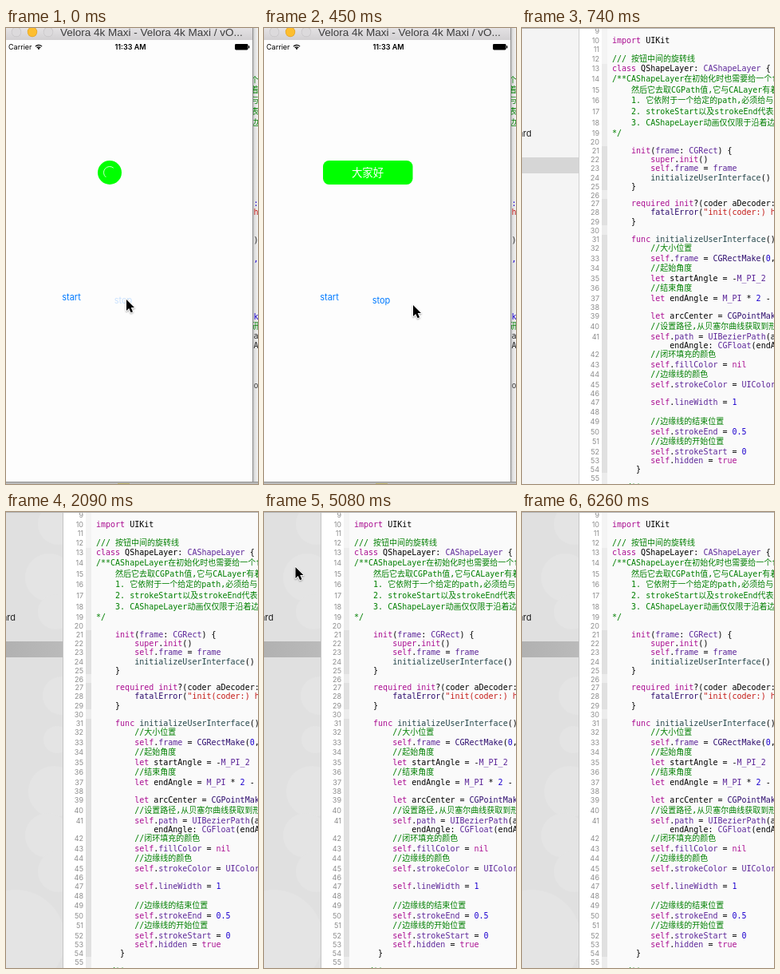
An HTML page with a canvas for the animation above (8000 ms loop, 316x571 px).

```html
<!DOCTYPE html>
<html lang="zh">
<head>
<meta charset="utf-8">
<style>
html, body { margin: 0; width: 100%; height: 100%; overflow: hidden; background: #fff; }
canvas { display: block; width: 316px; height: 571px; }
</style>
</head>
<body>
<canvas id="stage"></canvas>
<script>
const W = 316, H = 571, LOOP = 8000;
const canvas = document.getElementById('stage');
const ctx = canvas.getContext('2d');
const dpr = window.devicePixelRatio || 1;
canvas.width = W * dpr;
canvas.height = H * dpr;

const MONO = '10px "DejaVu Sans Mono", "Noto Sans CJK SC", "Noto Sans CJK", monospace';
const UI = 'Inter, "Open Sans", sans-serif';
const HAN = '"Noto Sans CJK SC", "Noto Sans CJK", sans-serif';

const GREEN = '#007f00', PINK = '#aa0d91', PURPLE = '#5c2699', NAVY = '#2e0d6e';
const BLUE = '#1c00cf', RED = '#c41a16', TEAL = '#26474b';

const words = (list, color) => list.split(' ').map(w => [w, color]);
const COLORS = new Map([
  ...words('import class init super self required func let nil true', PINK),
  ...words('CAShapeLayer CGRect M_PI M_PI_2 UIBezierPath CGFloat UIColor', PURPLE),
  ...words('frame path fillColor strokeColor lineWidth strokeEnd strokeStart hidden', PURPLE),
  ...words('CGRectMake CGPointMake fatalError', NAVY),
  ['initializeUserInterface', TEAL]
]);

// [vertical centre, code]; a leading ">" marks a wrapped line
const CODE = [
  [3, ''],
  [15, 'import UIKit'],
  [26, ''],
  [38, '/// 按钮中间的旋转线'],
  [50.5, 'class QShapeLayer: CAShapeLayer {'],
  [63, '/**CAShapeLayer在初始化时也需要给一个frame'],
  [77, '    然后它去取CGPath值,它与CALayer有着'],
  [90, '    1. 它依附于一个给定的path,必须给与'],
  [104, '    2. strokeStart以及strokeEnd代表着'],
  [118, '    3. CAShapeLayer动画仅仅限于沿着边'],
  [131, '*/'],
  [142, ''],
  [153, '    init(frame: CGRect) {'],
  [164, '        super.init()'],
  [175.5, '        self.frame = frame'],
  [187, '        initializeUserInterface()'],
  [198, '    }'],
  [209, ''],
  [219.5, '    required init?(coder aDecoder: NSCoder'],
  [230.5, '        fatalError("init(coder:) has'],
  [242, '    }'],
  [253, ''],
  [264, '    func initializeUserInterface() {'],
  [275.5, '        //大小位置'],
  [288.5, '        self.frame = CGRectMake(0, 0'],
  [300.5, '        //起始角度'],
  [313.5, '        let startAngle = -M_PI_2'],
  [325.5, '        //结束角度'],
  [338, '        let endAngle = M_PI * 2 - M_PI'],
  [349, ''],
  [360.5, '        let arcCenter = CGPointMake('],
  [373, '        //设置路径,从贝塞尔曲线获取到形状'],
  [386, '        self.path = UIBezierPath(arc'],
  [397, '>            endAngle: CGFloat(endAngle'],
  [408.5, '        //闭环填充的颜色'],
  [421.5, '        self.fillColor = nil'],
  [433.5, '        //边缘线的颜色'],
  [446.5, '        self.strokeColor = UIColor.'],
  [457, ''],
  [468.5, '        self.lineWidth = 1'],
  [480, ''],
  [492, '        //边缘线的结束位置'],
  [505, '        self.strokeEnd = 0.5'],
  [517, '        //边缘线的开始位置'],
  [530, '        self.strokeStart = 0'],
  [541, '        self.hidden = true'],
  [552, '     }'],
  [563, ''],
  [574, '   /**']
];

// Code peeking out beside the phone window
const PEEK = [
  [65, '个', GREEN], [77, '着', GREEN], [90, '与', GREEN], [104, '表', GREEN], [118, '边', GREEN],
  [219, ':', BLUE], [230, 'h', RED], [265, ')', '#222'], [289, ',', BLUE],
  [361, 'k', BLUE], [373, '研', GREEN], [385, 'a', '#222'], [397, 'A', '#222'], [447, 'or', '#444']
];

// [start, kind, x, y]
const POINTER = [
  [0, 'arrow', 150, 339], [450, 'arrow', 186, 346], [590, 'none', 0, 0],
  [2240, 'arrow', 33, 62], [2390, 'arrow', 35, 65], [5080, 'arrow', 38.5, 68],
  [5230, 'beam', 113, 118], [5380, 'beam', 155, 150], [5670, 'beam', 159, 195],
  [5820, 'beam', 162, 237], [6120, 'arrow', 92, 419], [6260, 'none', 0, 0]
];

function rect(x, y, w, h, fill) {
  ctx.fillStyle = fill;
  ctx.fillRect(x, y, w, h);
}

function disc(x, y, r, fill) {
  ctx.beginPath();
  ctx.arc(x, y, r, 0, Math.PI * 2);
  ctx.fillStyle = fill;
  ctx.fill();
}

function text(s, x, y, font, fill, align = 'left') {
  ctx.font = font;
  ctx.fillStyle = fill;
  ctx.textAlign = align;
  ctx.fillText(s, x, y);
}

function fade(x0, y0, x1, y1, ...stops) {
  const g = ctx.createLinearGradient(x0, y0, x1, y1);
  stops.forEach((c, i) => g.addColorStop(i / (stops.length - 1), c));
  return g;
}

function pill(x, y, w, h, r, fill) {
  ctx.beginPath();
  ctx.roundRect(x, y, w, h, r);
  ctx.fillStyle = fill;
  ctx.fill();
}

function arrow(x, y) {
  ctx.save();
  ctx.translate(x, y);
  ctx.beginPath();
  [[1, 1], [1, 15], [4.2, 12], [6.6, 17.3], [9, 16.2], [6.7, 11.1], [11, 11.1]]
    .forEach(p => ctx.lineTo(...p));
  ctx.closePath();
  ctx.lineJoin = 'round';
  ctx.lineWidth = 1.8;
  ctx.strokeStyle = '#fff';
  ctx.shadowColor = 'rgba(0,0,0,.35)';
  ctx.shadowBlur = 2;
  ctx.shadowOffsetY = 1;
  ctx.stroke();
  ctx.shadowColor = 'transparent';
  ctx.fillStyle = '#000';
  ctx.fill();
  ctx.restore();
}

function beam(x, y) {
  rect(x + 3, y + 1, 1, 14, '#222');
  rect(x + 2.5, y + 10, 2, 1, '#222');
  for (const edge of [0, 15]) {
    rect(x, y + edge, 3, 1, '#222');
    rect(x + 4, y + edge, 3, 1, '#222');
  }
}

function pointer(t) {
  const [, kind, x, y] = POINTER.filter(p => p[0] <= t).pop();
  if (kind === 'arrow') arrow(x, y);
  if (kind === 'beam') beam(x, y);
}

function wifi() {
  ctx.strokeStyle = '#000';
  ctx.lineWidth = 1.2;
  for (const r of [3.2, 5.6]) {
    ctx.beginPath();
    ctx.arc(41, 27, r, -Math.PI * 0.76, -Math.PI * 0.24);
    ctx.stroke();
  }
  disc(41, 25.8, 1.1, '#000');
}

function phone(t) {
  rect(0, 0, W, H, '#fff');
  rect(309, 0, 7, H, fade(309, 0, 316, 0, '#bdbdbd', '#e2e2e2', '#f3f3f3'));
  ctx.save();
  ctx.beginPath();
  ctx.rect(310, 12, 6, H);
  ctx.clip();
  for (const [y, s, color] of PEEK) text(s, /[a-z:,)]/i.test(s) ? 310.5 : 307, y + 3.5, MONO, color);
  ctx.restore();
  rect(0, 568, W, 3, fade(0, 568, 0, 571, '#888', '#b5b5b5', '#c4c4c4'));
  rect(140, 570, 15, 1, '#b8b070');

  rect(0, 0, 309, 15, fade(0, 0, 0, 15, '#e4e2e4', '#d2d0d2'));
  rect(0, 15, 309, 553, '#fdfdfd');
  rect(309, 0, 1, 569, '#8e8e8e');
  [[13, '#dcdadc', '#c4c2c4'], [33, '#fdbe2f', '#df9f25'], [53, '#dcdadc', '#c4c2c4']].forEach(([x, fill, rim]) => {
    disc(x, 5, 6.2, rim);
    disc(x, 5, 5.6, fill);
  });
  text('Velora 4k Maxi - Velora 4k Maxi / vO...', 68, 10, '13.5px "Liberation Sans", sans-serif', '#3c3c3c');

  text('Carrier', 3, 27, '9px ' + UI, '#000');
  wifi();
  text('11:33 AM', 156, 27, '600 9px ' + UI, '#000', 'center');
  pill(287, 20, 16.5, 7.4, 1.4, '#000');
  rect(304, 22.3, 1.3, 3, '#000');

  if (t < 150) {
    disc(130, 181, 15, '#00ff00');
    ctx.beginPath();
    ctx.arc(130, 181, 7.5, Math.PI * 0.72, Math.PI * 1.72);
    ctx.strokeStyle = '#fff';
    ctx.lineWidth = 0.8;
    ctx.stroke();
  } else {
    pill(74, 166, 112.5, 30, 7.5, '#00ff00');
    text('大家好', 130, 186, '300 13.4px ' + HAN, '#fff', 'center');
  }

  text('start', 82, 341, '11px ' + UI, '#007aff', 'center');
  ctx.globalAlpha = t < 150 ? 0.2 : t < 300 ? 0.5 : t < 450 ? 0.8 : 1;
  text('stop', 147, 345, '11px ' + UI, '#007aff', 'center');
  ctx.globalAlpha = 1;
}

function sidebar(t) {
  const active = t >= 2090;
  rect(0, 0, 71, H, active ? '#e0e0e0' : '#f4f4f4');
  if (active) {
    ctx.save();
    ctx.beginPath();
    ctx.rect(0, 0, 71, H);
    ctx.clip();
    [[66, 15, 26], [54, 82, 30], [62, 125, 22], [70, 230, 24], [64, 285, 17],
     [60, 350, 32], [52, 405, 28], [66, 450, 26], [12, 535, 62]].forEach(([x, y, r]) => disc(x, y, r, '#e4e4e4'));
    ctx.restore();
  }
  rect(0, 162, 71, 20, active ? fade(0, 0, 71, 0, '#b1b1b1', '#bababa') : t < 740 ? '#cacaca' : '#d6d6d6');
  text('ard', 12, 136, '11px ' + UI, '#222', 'right');
  rect(71, 0, 1, H, active ? '#c4c4c4' : '#d0d0d0');
}

// Fold ribbon, darker beside each nested block
function ribbon() {
  rect(100, 0, 7, H, '#f4f4f4');
  rect(100, 45, 7, H, '#ececec');
  for (const [top, bottom] of [[148, 203], [214, 247], [259, 557]]) rect(100, top, 7, bottom - top, '#e0e0e0');
}

function codeLine(s, y, comment) {
  let x = 113;
  const parts = comment ? [s] : s.match(/"[^"]*"?|[A-Za-z_]\w*|\d+(\.\d+)?|\s+|./g) || [];
  for (const part of parts) {
    const color = comment ? GREEN
      : part[0] === '"' ? RED
      : /^\d/.test(part) ? BLUE
      : COLORS.get(part) || '#000';
    text(part, x, y, MONO, color);
    x += ctx.measureText(part).width;
  }
}

function editor(t) {
  rect(0, 0, W, H, '#fafafa');
  sidebar(t);
  rect(72, 0, 28, H, '#fff');
  ribbon();
  let number = 9, block = false;
  for (const [y, raw] of CODE) {
    const wrapped = raw[0] === '>';
    const s = wrapped ? raw.slice(1) : raw;
    if (!wrapped) text(number++, 97, y + 3.5, '9px ' + UI, '#8c8c8c', 'right');
    if (/^\s*\/\*\*/.test(s)) block = true;
    codeLine(s, y + 3.5, block || /^\s*\/\//.test(s));
    if (s.includes('*/')) block = false;
  }
  rect(0, 0, W, 1, '#b4b4b4');
}

function draw(now) {
  const t = now % LOOP;
  ctx.setTransform(dpr, 0, 0, dpr, 0, 0);
  if (t < 590) phone(t);
  else editor(t);
  pointer(t);
}

const start = performance.now();
function tick() {
  draw(performance.now() - start);
  requestAnimationFrame(tick);
}
tick();
</script>
</body>
</html>
```
